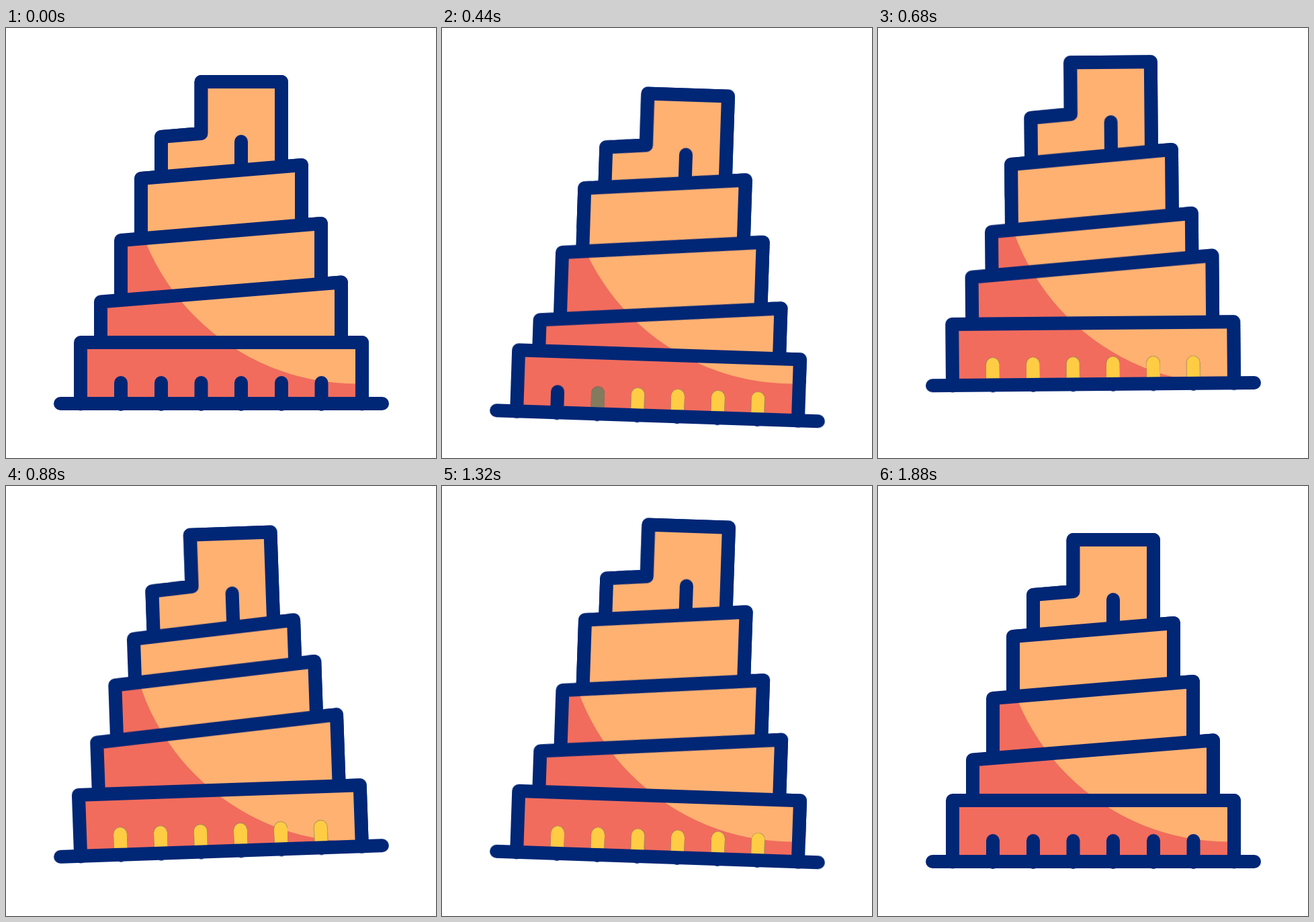
An HTML page without scripts for the animation above (2.56 s loop, 640x640 px).

```html
<!DOCTYPE html>
<html lang="en">
<head>
<meta charset="utf-8">
<title>Hopping tower</title>
<style>
  html, body { margin: 0; width: 100%; height: 100%; overflow: hidden; background: #fff; }
  svg { display: block; width: 100vw; height: 100vh; }

  .hop, .rock, .tier, .lamp { animation: 2560ms cubic-bezier(.33, 0, .67, 1) infinite; }
  .hop { animation-name: hop; }
  .rock { animation-name: rock; transform-origin: 320px 559px; }
  .tier { animation-name: sway; animation-delay: calc(var(--i) * 200ms); }
  .lamp { animation-name: glow; animation-delay: calc(var(--i) * 80ms); animation-timing-function: linear; opacity: 0; }

  .line { fill: none; stroke: #002676; stroke-width: 20; stroke-linecap: round; stroke-linejoin: round; }
  .wall { fill: currentColor; }
  .lamp { fill: #ffcc44; }

  @keyframes hop {
    0% { transform: translateY(0); }
    15.63% { transform: translateY(21px); }
    26.95% { transform: translateY(-29px); }
    39.65% { transform: translateY(-7.5px); }
    46.88% { transform: translateY(-18px); }
    51.17% { transform: translateY(-7px); }
    62.5%, 100% { transform: translateY(0); }
  }
  @keyframes rock {
    0% { transform: rotate(0deg); }
    15.63% { transform: rotate(2deg); }
    34.38%, 39.45% { transform: rotate(-2deg); }
    50.78% { transform: rotate(2deg); }
    62.5%, 100% { transform: rotate(0deg); }
  }
  @keyframes sway {
    0%, 4% { transform: translateY(0); }
    18.75% { transform: translateY(15px); }
    30.86% { transform: translateY(-19px); animation-timing-function: cubic-bezier(.55, 0, .7, 1); }
    42.19%, 100% { transform: translateY(0); }
  }
  @keyframes glow {
    0%, 3.125% { opacity: 0; }
    6.25%, 54.6875% { opacity: 1; }
    57.8125%, 100% { opacity: 0; }
  }
</style>
</head>
<body>
<svg viewBox="0 0 640 640">
  <defs>
    <mask id="light" maskUnits="userSpaceOnUse" x="0" y="0" width="640" height="640">
      <circle cx="522" cy="190" r="339.5" fill="#fff"/>
    </mask>
    <g id="top">
      <path class="line wall" d="M231 255V162L290.500 157V80H410V245"/>
      <path class="line" d="M350 169V240"/>
    </g>
    <path id="fourth" class="line wall" d="M201 354V224L440 204V332"/>
    <path id="third" class="line wall" d="M171 446V316L469 291V420"/>
    <path id="second" class="line wall" d="M141 505V407.500L499 378.500V505"/>
    <path id="ground" class="line wall" d="M111 559.500V468H530V559.500"/>
    <path id="pane" d="M-10 549V528a10 10 0 0 1 20 0V549Z"/>
  </defs>

  <!-- shaded tower; upper tiers sit behind the ones below -->
  <g color="#f16c5d"><g class="hop"><g class="rock">
    <g class="tier" style="--i:3"><use href="#top"/></g>
    <g class="tier" style="--i:2"><use href="#fourth"/></g>
    <g class="tier" style="--i:1"><use href="#third"/></g>
    <g class="tier" style="--i:0"><use href="#second"/></g>
    <use href="#ground"/>
  </g></g></g>

  <!-- the same tower inside the fixed pool of light -->
  <g color="#ffb171" mask="url(#light)"><g class="hop"><g class="rock">
    <g class="tier" style="--i:3"><use href="#top"/></g>
    <g class="tier" style="--i:2"><use href="#fourth"/></g>
    <g class="tier" style="--i:1"><use href="#third"/></g>
    <g class="tier" style="--i:0"><use href="#second"/></g>
    <use href="#ground"/>
  </g></g></g>

  <g class="hop"><g class="rock">
    <path class="line" d="M171 528V560M231 528V560M290.500 528V560M350 528V560M410 528V560M469.500 528V560"/>
    <g class="lamp" style="--i:5"><use href="#pane" x="171"/></g>
    <g class="lamp" style="--i:4"><use href="#pane" x="231"/></g>
    <g class="lamp" style="--i:3"><use href="#pane" x="290.500"/></g>
    <g class="lamp" style="--i:2"><use href="#pane" x="350"/></g>
    <g class="lamp" style="--i:1"><use href="#pane" x="410"/></g>
    <g class="lamp" style="--i:0"><use href="#pane" x="469.500"/></g>
    <path class="line" d="M81 559H560"/>
  </g></g>
</svg>
</body>
</html>
```
